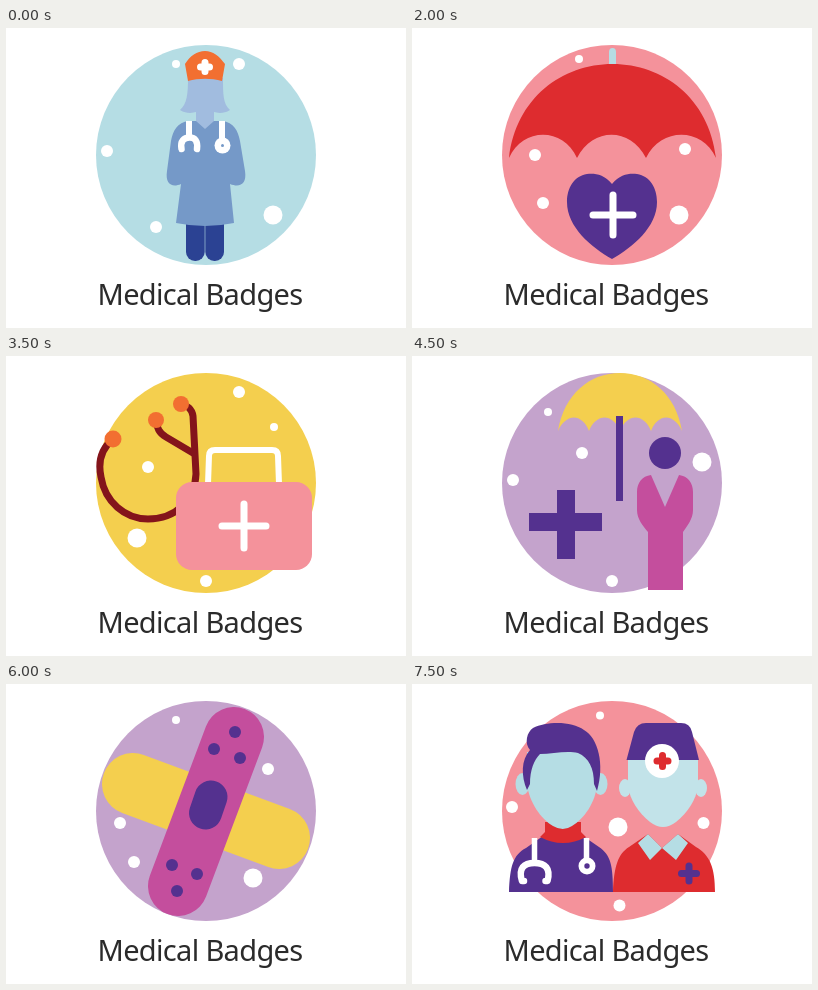
Recreate the animation shown at these times as an HTML page. Size 400 by 300 pixels, loop 8 s.

```html
<!DOCTYPE html>
<html lang="en">
<head>
<meta charset="utf-8">
<title>Medical Badges</title>
<style>
  :root {
    --aqua: #b5dde4; --lilac: #c4a3cc; --pink: #f4929b; --yellow: #f4cf4e;
    --orange: #f26f31; --purple: #54318f; --magenta: #c44e9d; --red: #de2c2f;
    --navy: #2b4293; --steel: #7599c8; --maroon: #84141b;
  }
  html, body { margin: 0; width: 100%; height: 100%; overflow: hidden; background: #fff; }
  svg { display: block; width: 100vw; height: 100vh; }
  text { font: 29px "Noto Sans", "Open Sans", sans-serif; letter-spacing: -.66px; fill: #2b2b2b; }
  .aqua { fill: var(--aqua); } .lilac { fill: var(--lilac); }
  .pink { fill: var(--pink); } .yellow { fill: var(--yellow); }
  .orange { fill: var(--orange); } .purple { fill: var(--purple); }
  .magenta { fill: var(--magenta); } .red { fill: var(--red); }
  .navy { fill: var(--navy); } .steel { fill: var(--steel); }
  .white { fill: #fff; }
  .line { fill: none; stroke: #fff; stroke-linecap: round; stroke-linejoin: round; }
  .flat { stroke-linecap: butt; }

  /* Sixteen half-second turns, each badge cut in hard */
  .turn {
    visibility: hidden;
    animation: turn 8s step-end infinite;
    animation-delay: calc((var(--i) - 16) * .5s);
  }
  @keyframes turn {
    0% { visibility: visible; }
    6.25%, 100% { visibility: hidden; }
  }
</style>
</head>
<body>
<svg viewBox="0 0 400 300">
  <defs>
    <circle id="disc" cx="200" cy="127" r="110"/>
    <path id="plus" d="M-1 0H1M0 -1V1" vector-effect="non-scaling-stroke"/>

    <g id="nurse">
      <use href="#disc" class="aqua"/>
      <g class="white">
        <circle cx="170" cy="36" r="4"/><circle cx="233" cy="36" r="6"/>
        <circle cx="101" cy="123" r="6"/><circle cx="150" cy="199" r="6"/>
        <circle cx="267" cy="187" r="9.5"/>
      </g>
      <rect class="navy" x="180" y="185" width="18.7" height="48" rx="9"/>
      <rect class="navy" x="199.300" y="185" width="18.7" height="48" rx="9"/>
      <path class="steel" d="M183 93H216C228 94 232 103 234 113L239 143C241 156 234 160 224 156L228 195Q199 201 170 195L175 156C166 160 159 156 161 143L165 113C167 103 171 94 183 93Z"/>
      <path fill="#a1bcdf" d="M182 50H217C217 66 217 76 224 82C218 86 211 85 208 84V93L199 101L190 93V84C187 85 180 86 174 82C181 76 182 66 182 50Z"/>
      <path class="orange" d="M182 53L179 36C184 28 191 23 199 23C207 23 213 28 219 36L216 53C205 50 193 50 182 53Z"/>
      <path class="line" stroke-width="7" d="M194.500 39H203.500M199 34.500V43.500"/>
      <path class="line flat" stroke-width="6" d="M183 93V109M216 93V112"/>
      <path class="line" stroke-width="6.500" d="M175.500 121C174 113 178 109.500 183.500 109.500S192 113 191 121"/>
      <circle class="white" cx="216.500" cy="117.500" r="8"/>
      <circle class="steel" cx="216.500" cy="117.500" r="1.500"/>
    </g>

    <g id="cover">
      <use href="#disc" class="lilac"/>
      <g class="white">
        <circle cx="136" cy="56" r="4"/><circle cx="170" cy="97" r="6"/>
        <circle cx="101" cy="124" r="6"/><circle cx="290" cy="106" r="9.5"/>
        <circle cx="200" cy="225" r="6"/>
      </g>
      <path class="yellow" d="M146 75C152 38 178 17 208 17C238 17 264 38 270 75C262 57 246 57 239 75C232 57 215 57 208 75C201 57 184 57 177 75C170 57 154 57 146 75Z"/>
      <path class="purple" d="M204 60H211V145H204ZM145 134H163V157H190V175H163V203H145V175H117V157H145Z"/>
      <circle class="purple" cx="253" cy="97" r="16"/>
      <path class="magenta" d="M239 119L253 151L267 119C276 120 281 127 281 136V154C281 163 275 170 271 176V234H236V176C231 170 225 163 225 154V136C225 127 230 120 239 119Z"/>
    </g>

    <g id="heart">
      <use href="#disc" class="pink"/>
      <g class="white">
        <circle cx="167" cy="31" r="4"/><circle cx="123" cy="127" r="6"/>
        <circle cx="273" cy="121" r="6"/><circle cx="131" cy="175" r="6"/>
        <circle cx="267" cy="187" r="9.5"/>
      </g>
      <path class="aqua" d="M197 40V24Q197 20 200.500 20Q204 20 204 24V40Z"/>
      <path class="red" d="M97 130C104 70 150 36 200.500 36C251 36 297 70 304 130C290 99 249 99 234 130C218 99 181 99 165 130C151 99 111 99 97 130Z"/>
      <path class="purple" d="M200 156C208 146 218 145 225 146C238 148 245 160 245 174C245 199 221 219 200 231C179 219 155 199 155 174C155 160 162 148 175 146C182 145 192 146 200 156Z"/>
      <use href="#plus" class="line" stroke-width="7" transform="translate(201 187) scale(20)"/>
    </g>

    <g id="bag">
      <use href="#disc" class="yellow"/>
      <g class="white">
        <circle cx="233" cy="36" r="6"/><circle cx="268" cy="71" r="4"/>
        <circle cx="142" cy="111" r="6"/><circle cx="131" cy="182" r="9.5"/>
        <circle cx="200" cy="225" r="6"/>
      </g>
      <g class="line" style="stroke: var(--maroon)" stroke-width="7">
        <path d="M107 83C95 93 92 107 95 121C99 146 119 163 142 163C170 163 189 144 190 118L187 60C186 53 181 49 175 48"/>
        <path d="M150 64C151 72 153 77 160 81L187 97"/>
      </g>
      <g class="orange">
        <circle cx="107" cy="83" r="8.500"/><circle cx="150" cy="64" r="8"/>
        <circle cx="175" cy="48" r="8"/>
      </g>
      <path class="line" stroke-width="6" d="M202 128L203 100Q203 94 209 94H266Q272 94 272 100L273 128"/>
      <rect class="pink" x="170" y="126" width="136" height="88" rx="16"/>
      <use href="#plus" class="line" stroke-width="7" transform="translate(238 170) scale(22)"/>
    </g>

    <g id="scope">
      <use href="#disc" class="aqua"/>
      <g class="white">
        <circle cx="170" cy="36" r="4"/><circle cx="249" cy="85" r="6"/>
        <circle cx="147" cy="133" r="6"/><circle cx="182" cy="195" r="6"/>
        <circle cx="260" cy="176" r="9.5"/>
      </g>
      <g class="line" style="stroke: var(--navy)" stroke-width="7.500">
        <path d="M126 112C120 140 123 179 139 202C154 223 180 232 207 232C253 232 286.500 203 286.500 150V112C289 80 290 58 283 42C278 32 266 31 252 34"/>
        <path d="M213 57C200 68 203 86 214 94L264 131"/>
      </g>
      <path class="steel" d="M261 129L285 115Q290.500 113 291 119V145Q291 151 285 149L261 135Q257 132 261 129Z"/>
      <g class="orange">
        <circle cx="128.700" cy="103" r="21"/><circle cx="213" cy="57" r="13.500"/>
        <circle cx="251.500" cy="34.500" r="13.500"/>
      </g>
      <circle class="navy" cx="128.700" cy="103" r="5.700"/>
    </g>

    <g id="plaster">
      <use href="#disc" class="lilac"/>
      <g class="white">
        <circle cx="170" cy="36" r="4"/><circle cx="262" cy="85" r="6"/>
        <circle cx="114" cy="139" r="6"/><circle cx="128" cy="178" r="6"/>
        <circle cx="247" cy="194" r="9.5"/>
      </g>
      <g class="line">
        <path style="stroke: var(--yellow)" stroke-width="62" d="M127 100L273 154"/>
        <path style="stroke: var(--magenta)" stroke-width="60" d="M228 53L172 202"/>
        <path style="stroke: var(--purple)" stroke-width="33" d="M205 113L199.500 129"/>
      </g>
      <g class="purple">
        <circle cx="229" cy="48" r="6"/><circle cx="208" cy="65" r="6"/>
        <circle cx="234" cy="74" r="6"/><circle cx="166" cy="181" r="6"/>
        <circle cx="191" cy="190" r="6"/><circle cx="171" cy="207" r="6"/>
      </g>
    </g>

    <g id="staff">
      <use href="#disc" class="pink"/>
      <g class="white">
        <circle cx="188" cy="31.500" r="4"/><circle cx="100" cy="123" r="6"/>
        <circle cx="206" cy="143" r="9.5"/><circle cx="291.500" cy="139" r="6"/>
        <circle cx="207.500" cy="221.500" r="6"/>
      </g>
      <path class="purple" d="M97 208C98 182 101 171 114 164L131 152H171L187 163C199 171 201 182 201 208Z"/>
      <path class="red" d="M133 138H169V148L174 153Q151 165 128 153L133 148Z"/>
      <g class="aqua">
        <ellipse cx="110.500" cy="100" rx="7" ry="11"/>
        <ellipse cx="188.500" cy="100" rx="7" ry="11"/>
        <path d="M115 68H185V100C184 118 172 135 160 142Q151 148 141 142C129 135 117 118 115 100Z"/>
      </g>
      <path class="purple" d="M115 106C109 92 109 76 118 66C112 59 115 48 121 44C135 37 160 37 172 46C186 54 193 80 185 107L182 100C182 84 177 74 166 69C155 66 140 70 128 70C122 76 118 86 118 100Z"/>
      <path class="line flat" stroke-width="5.500" d="M122.500 154V179M174.500 154V176"/>
      <path class="line" stroke-width="6.500" d="M112 197H110C106 184 112 179 122.500 179S139 184 135.500 197H133.500"/>
      <circle class="white" cx="175" cy="182" r="8.500"/>
      <circle class="purple" cx="175" cy="182" r="2.700"/>

      <path class="red" d="M201 208C202 182 206 170 217 163L236 150L250 164L266 150L284 163C298 171 303 184 303 208Z"/>
      <path class="aqua" d="M226 159L236 150L250 164L238 176ZM276 159L266 150L250 164L264 176Z"/>
      <g fill="#c2e3e9">
        <ellipse cx="213" cy="104" rx="6" ry="9"/>
        <ellipse cx="289" cy="104" rx="6" ry="9"/>
        <path d="M216 74H286V102C284 116 276 128 264 138Q251 148 238 138C226 128 218 116 216 102Z"/>
      </g>
      <path class="purple" d="M214.500 76L222 48Q225 39 234 39H269Q278 39 280 48L287 76Z"/>
      <circle class="white" cx="250" cy="77" r="17"/>
      <g class="line" stroke-width="7">
        <use href="#plus" style="stroke: var(--red)" transform="translate(250.500 77) scale(5.500)"/>
        <use href="#plus" style="stroke: var(--purple)" transform="translate(277 189.500) scale(7.500)"/>
      </g>
    </g>
  </defs>

  <use class="turn" style="--i:0" href="#nurse"/>
  <use class="turn" style="--i:1" href="#bag"/>
  <use class="turn" style="--i:2" href="#cover"/>
  <use class="turn" style="--i:3" href="#scope"/>
  <use class="turn" style="--i:4" href="#heart"/>
  <use class="turn" style="--i:5" href="#staff"/>
  <use class="turn" style="--i:6" href="#plaster"/>
  <use class="turn" style="--i:7" href="#bag"/>
  <use class="turn" style="--i:8" href="#nurse"/>
  <use class="turn" style="--i:9" href="#cover"/>
  <use class="turn" style="--i:10" href="#scope"/>
  <use class="turn" style="--i:11" href="#heart"/>
  <use class="turn" style="--i:12" href="#plaster"/>
  <use class="turn" style="--i:13" href="#bag"/>
  <use class="turn" style="--i:14" href="#nurse"/>
  <use class="turn" style="--i:15" href="#staff"/>

  <text x="91.500" y="277">Medical Badges</text>
</svg>
</body>
</html>
```
